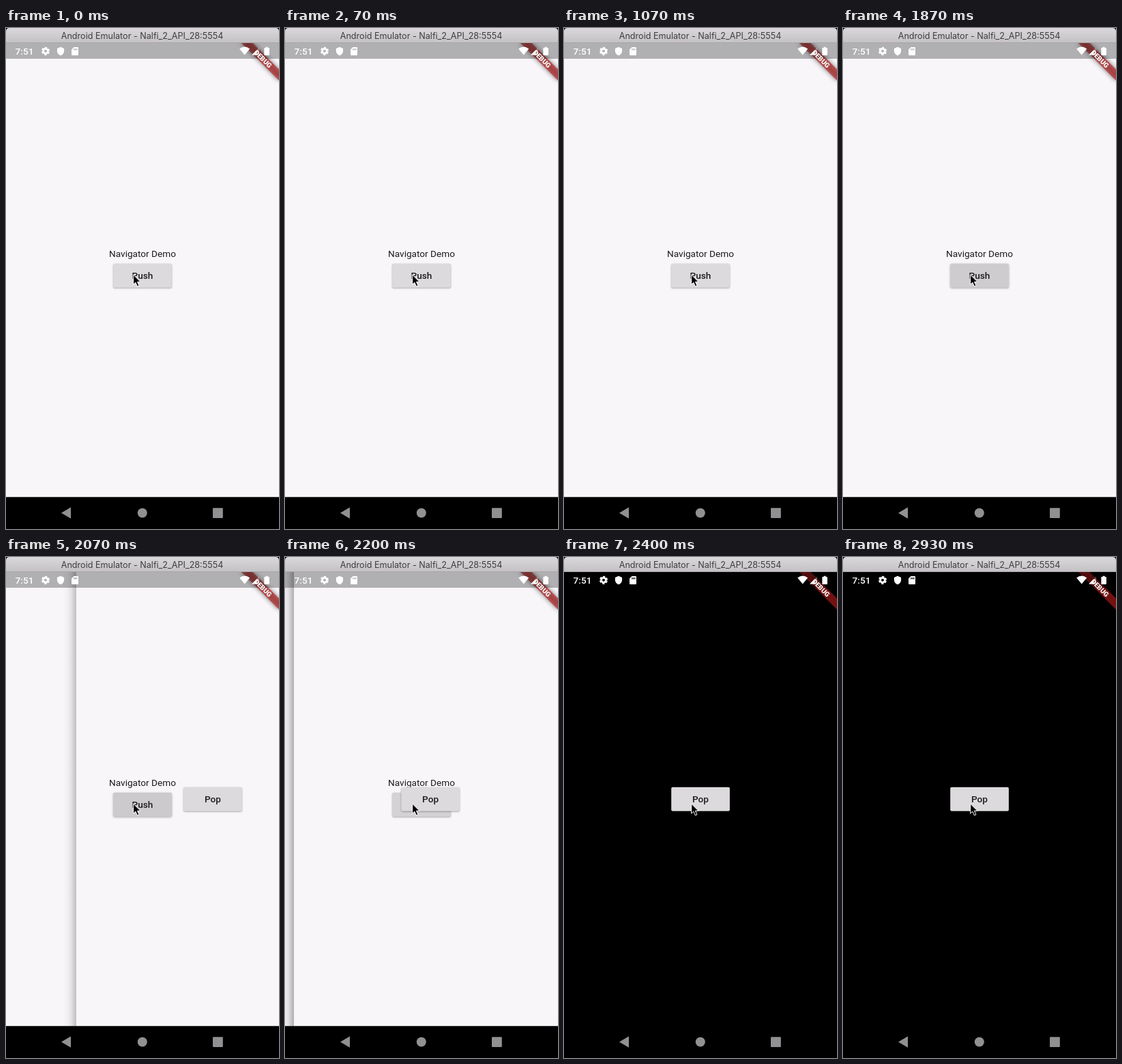
An HTML page that plays this animation: 400 by 733 pixels, repeating every 2.99 s.

```html
<!DOCTYPE html>
<html lang="en">
<head>
<meta charset="utf-8">
<title>Navigator Demo</title>
<style>
  html, body { margin: 0; width: 100%; height: 100%; overflow: hidden; background: #000; }
  svg { display: block; width: 100vw; height: 100vh; }
  text { font: 13.62px Roboto, sans-serif; fill: #1c1b1d; text-anchor: middle; }
  .label, .clock { font-weight: 500; }
  .clock { fill: #fff; text-anchor: start; }
  .title { font: 12.6px Inter, sans-serif; fill: #3e3d3f; }
  .tag { font-size: 9.92px; font-weight: 900; fill: #fff; }
  .raised { filter: drop-shadow(0 1px 1px rgba(0, 0, 0, .32)); }
</style>
</head>
<body>
<svg viewBox="0 0 400 733" preserveAspectRatio="none">
  <defs>
    <linearGradient id="bar" x2="0" y2="1">
      <stop stop-color="#dad8da"/><stop offset="1" stop-color="#c3c1c3"/>
    </linearGradient>
    <linearGradient id="edge">
      <stop stop-opacity="0"/>
      <stop offset=".3" stop-opacity=".025"/>
      <stop offset=".6" stop-opacity=".1"/>
      <stop offset="1" stop-opacity=".31"/>
    </linearGradient>
    <filter id="soft" x="-30%" y="-150%" width="160%" height="400%"><feGaussianBlur stdDeviation="3.9"/></filter>
    <clipPath id="screen"><path d="M0 22h400v664.5H0z"/></clipPath>
  </defs>

  <g clip-path="url(#screen)">
    <g id="home">
      <path fill="#f8f6f9" d="M0 22h400v665H0z"/>
      <text x="200" y="335">Navigator Demo</text>
      <rect id="push" class="raised" x="157.2" y="344.8" width="85.7" height="35" rx="2"/>
      <text class="label" x="200" y="366.8">Push</text>
    </g>
    <g id="page">
      <path fill="url(#edge)" id="shade" d="M-20 22h20v665h-20z"/>
      <rect class="raised" x="157.2" y="336.7" width="85.7" height="35" rx="2" fill="#dcdadd"/>
      <text class="label" x="200" y="358.9">Pop</text>
    </g>
    <g transform="translate(400 22) rotate(45) scale(.973)">
      <path fill-opacity=".5" filter="url(#soft)" d="M-40 28h80v12h-80z"/>
      <path fill="#b71c1c" fill-opacity=".627" d="M-40 28h80v12h-80z"/>
    </g>
    <path fill-opacity=".29" d="M0 22h400v23H0z"/>
    <g transform="translate(400 22) rotate(45)"><text class="tag" x="0" y="36.6">DEBUG</text></g>
  </g>

  <text class="clock" x="13.6" y="38.8">7:51</text>
  <g fill="#fff">
    <circle cx="58" cy="33.8" r="3.4" fill="none" stroke="#fff" stroke-width="2.8"/>
    <circle cx="58" cy="33.8" r="5.2" fill="none" stroke="#fff" stroke-width="1.8" stroke-dasharray="3.2 2.245" stroke-dashoffset="-1.12"/>
    <path d="M80 27.8l5.1 2.2v3.6c0 3.2-2.2 5.8-5.1 6.6-2.9-.8-5.1-3.4-5.1-6.6V30z"/>
    <path fill-rule="evenodd" d="M99.6 28h5.3q1.1 0 1.1 1.1v9.8q0 1.1-1.1 1.1h-7.8q-1.1 0-1.1-1.1v-7.3zM99.3 30v2.6h1.2V30zm2 0v2.6h1.2V30zm2 0v2.6h1.2V30z"/>
    <path d="M349.7 39.6L342.2 30.4Q349.7 24.8 357.2 30.4z"/>
    <path fill-opacity=".3" d="M360 39.6L371 28.6V39.6z"/>
    <path d="M360 39.6L367.5 32.1V39.6z"/>
    <path d="M380.6 27.8h3v1.3h1.4q.9 0 .9.9v9q0 .9-.9.9h-5.8q-.9 0-.9-.9v-9q0-.9.9-.9h1.4z"/>
  </g>

  <path d="M0 686.5h400V733H0z"/>
  <g fill="#919093">
    <path d="M81 709.5L95 701.3V717.7z"/>
    <circle cx="199.8" cy="709.5" r="7"/>
    <rect x="303" y="702.2" width="14.8" height="14.8" rx="1"/>
  </g>

  <path d="M0 0h400v22H0z"/>
  <path fill="url(#bar)" d="M0 22V5Q0 0 5 0H395Q400 0 400 5V22z"/>
  <path fill="#a9a7a9" d="M0 21h400v1H0z"/>
  <text class="title" x="199.5" y="16">Android Emulator - Nalfi_2_API_28:5554</text>

  <path stroke="#fff" stroke-linejoin="round"
    d="M186.7 361.1V375.3L189.9 372.3 192.4 378 194.9 376.9 192.5 371.4H197z"/>
</svg>
<script>
  const LOOP = 2990, TICK = 200 / 3;
  const SLIDE_START = 1941, SLIDE_MS = 400, PRESS = 28, SWAP = 36;
  // Button grey and shadow depth for each tick after the press
  const PRESSED = [[206, 1.5], [203, 1.7], [202, 1.7], [204, 1.5], [208, 1.4], [212, 1.2], [216, 1], [219, 1]];
  const REST = [220, 1];
  const [home, push, page, shade] = ['home', 'push', 'page', 'shade'].map(id => document.getElementById(id));

  const bezier = (s, a, b) => 3 * s * (1 - s) ** 2 * a + 3 * s * s * (1 - s) * b + s ** 3;

  function linearToEaseOut(x) {
    if (x <= 0 || x >= 1) return x <= 0 ? 0 : 1;
    let lo = 0, hi = 1;
    for (let i = 0; i < 24; i++) {
      const mid = (lo + hi) / 2;
      if (bezier(mid, .35, .33) < x) lo = mid; else hi = mid;
    }
    return bezier(lo, .91, .97);
  }

  function draw(t) {
    const tick = Math.floor(t / TICK + .06);
    const p = linearToEaseOut((tick * TICK - SLIDE_START) / SLIDE_MS);
    const [grey, depth] = PRESSED[tick - PRESS] || REST;
    push.style.fill = `rgb(${grey}, ${grey - 2}, ${grey + 1})`;
    push.style.filter = `drop-shadow(0 ${depth}px ${depth}px rgba(0, 0, 0, .32))`;
    home.style.display = tick < SWAP ? '' : 'none';
    page.style.display = p > 0 ? '' : 'none';
    page.setAttribute('transform', `translate(${400 * (1 - p)} 0)`);
    shade.setAttribute('opacity', p);
  }

  const start = performance.now();
  function loop(now) {
    draw(Math.max(0, now - start) % LOOP);
    requestAnimationFrame(loop);
  }
  draw(0);
  requestAnimationFrame(loop);
</script>
</body>
</html>
```
